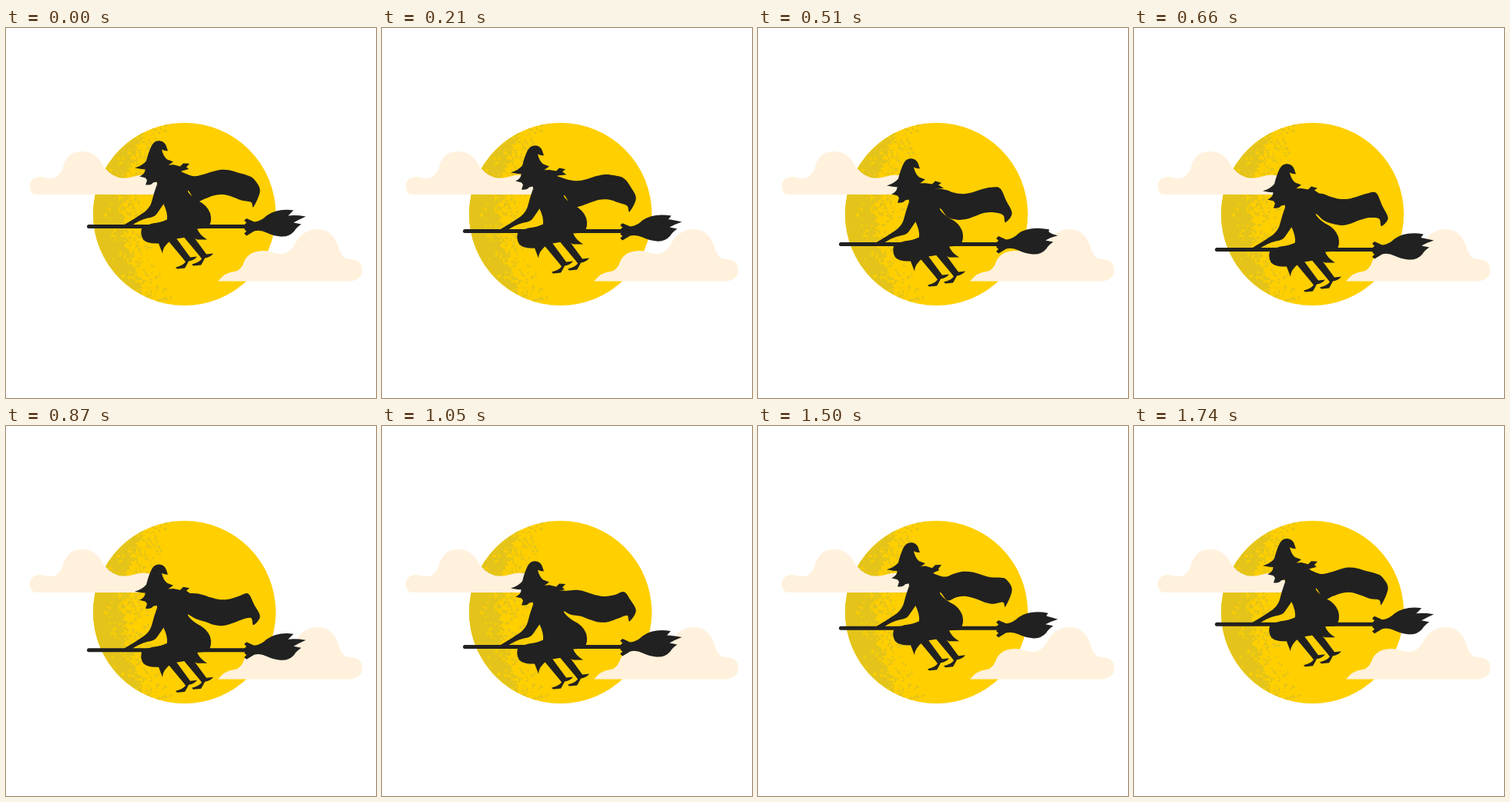
These frames come from a looping animation (480 by 480 pixels, 1.77 s). An HTML page with a canvas:

```html
<!DOCTYPE html>
<html lang="en">
<head>
<meta charset="utf-8">
<title>Witch over the moon</title>
<style>
html, body { margin: 0; width: 100%; height: 100%; overflow: hidden; background: #fff; }
canvas { display: block; width: 480px; height: 480px; }
</style>
</head>
<body>
<canvas id="stage" width="480" height="480"></canvas>
<script>
const ctx = document.getElementById('stage').getContext('2d');
const LOOP = 1770, STEP = 30, TAU = Math.PI * 2;
const INK = '#212121', GOLD = '#ffcf00', SHADE = '#e4c41a', CREAM = '#fff1dc';
const MOON = { x: 231.5, y: 241.5, r: 118.5 };

// Rigid silhouette parts; y = 0 is the broomstick
const HAT = new Path2D('M167 -76 Q177 -79 182 -85 Q185 -97 189 -105 Q193 -112 200 -111 Q206 -110 208 -104 L210 -98 Q205 -98 202 -100 Q204 -91 209 -87 L217 -84 Q211 -79 204 -76 L184 -74 Q176 -74 167 -76Z');
const FACE = new Path2D('M181 -76 L180 -71 Q178 -67 173 -65 L181 -63 L183 -60 L181 -54 Q188 -53 191 -57 L196 -58 L198 -48 L226 -48 L230 -70 L208 -80Z');
const TORSO = new Path2D('M195 -62 Q197 -52 197 -44 L204 -30 Q210 -18 209 -9 Q201 -5 190 -4 L177 0 Q173 9 178 17 Q184 23 198 22 L203 35 Q203 26 215 17 L239 13 L248 17 L261 17 Q251 11 248 3 L262 2 Q268 -6 265 -17 Q261 -28 248 -34 Q240 -39 236 -45 L234 -68 L222 -72 L200 -74Z');
const ARM = new Path2D('M196 -55 Q192 -44 189 -32 Q187 -25 180 -19 Q167 -10 153 -2 L161 0 Q172 -8 184 -11 Q193 -12 196 -17 L205 -30Z');
const LEG = new Path2D('M205 12 L230 42 L233 46 Q229 51 220 53 L222 55 L232 54 Q235 49 237 45 Q244 44 248 39 L239 40 L217 10Z');

// 1 at the peak time, -1 half a period away
const swing = (t, peak, period = LOOP) => Math.cos((t - peak) / period * TAU);

// Closed curve through all points
function smooth(g, pts) {
  const n = pts.length, at = i => pts[(i + n) % n];
  g.beginPath();
  g.moveTo(...pts[0]);
  for (let i = 0; i < n; i++) {
    const [a, b, c, d] = [at(i - 1), at(i), at(i + 1), at(i + 2)];
    g.bezierCurveTo(b[0] + (c[0] - a[0]) / 6, b[1] + (c[1] - a[1]) / 6,
      c[0] - (d[0] - b[0]) / 6, c[1] - (d[1] - b[1]) / 6, c[0], c[1]);
  }
  g.fill();
}

function makeRandom(seed) {
  return () => (seed = (seed * 16807) % 2147483647) / 2147483647;
}

function drawMoon(g) {
  const rnd = makeRandom(77);
  const clamp = v => Math.max(0, Math.min(1, v));
  const edge = y => 196 + 28 * ((y - MOON.y) / MOON.r) ** 2;
  g.save();
  g.beginPath();
  g.arc(MOON.x, MOON.y, MOON.r, 0, TAU);
  g.fillStyle = GOLD;
  g.fill();
  g.clip();
  // grainy shadow, dense at the left rim
  g.fillStyle = SHADE;
  g.beginPath();
  g.moveTo(100, 110);
  for (let y = 110; y <= 370; y += 3) g.lineTo(edge(y) - 46 + rnd() * 8, y);
  g.lineTo(100, 370);
  g.fill();
  for (let i = 0; i < 2800; i++) {
    const x = 112 + rnd() * 112, y = 122 + rnd() * 240;
    const depth = (edge(y) - x) / 50;
    const light = depth > 0.85;
    const chance = light ? 0.25 * clamp(1.6 - depth) : clamp(depth) ** 1.2 * 0.85;
    const w = 0.7 + rnd() * 1.8, h = 0.6 + rnd() * 1.3, turn = rnd() * 3;
    if (rnd() > chance) continue;
    g.fillStyle = light ? GOLD : SHADE;
    g.beginPath();
    g.ellipse(x, y, w, h, turn, 0, TAU);
    g.fill();
  }
  g.restore();
}

function drawClouds(g) {
  g.fillStyle = CREAM;
  g.fill(new Path2D('M41 216 Q31 216 31 206 Q31 194 43 193 Q49 193 54 195 Q67 197 73 184 Q78 160 98 160 Q115 160 123 174 Q132 190 146 194 Q155 196 165 193 Q179 188 190 193 Q197 197 198 216Z'));
  g.fill(new Path2D('M275 328.500 Q284 317 296 316 Q305 315 309 303 Q315 289 334 289 Q343 289 349 292 Q366 297 375 280 Q385 261 405 261 Q424 262 431 283 Q435 300 446 300 Q462 300 462 314 Q462 327 446 328.500Z'));
}

function drawBroom(t) {
  ctx.lineWidth = 5;
  ctx.lineCap = 'round';
  ctx.beginPath();
  ctx.moveTo(107.5, 0);
  ctx.lineTo(318, 0);
  ctx.stroke();

  // bristles: the top notch opens and closes
  const k = 0.5 - 0.5 * swing(t, 0, LOOP / 2);
  ctx.beginPath();
  ctx.moveTo(322, -6);
  ctx.quadraticCurveTo(331, -7, 338, -14);
  ctx.quadraticCurveTo(352, -24, 373 + 5 * k, -21 + 2 * k);
  ctx.lineTo(366 + 12 * k, -14 - 3 * k);
  ctx.quadraticCurveTo(376, -15, 389, -13 + 2 * k);
  ctx.quadraticCurveTo(380, -9, 373, -5);
  ctx.lineTo(383, -3);
  ctx.quadraticCurveTo(376, 2, 374, 6);
  ctx.quadraticCurveTo(367, 14, 356, 13);
  ctx.quadraticCurveTo(346, 12, 338, 8);
  ctx.quadraticCurveTo(330, 4, 322, 6);
  // ragged binding
  for (let i = 0; i <= 8; i++) ctx.lineTo(i % 2 ? 309 : 312, 12 - i * 2.8);
  ctx.fill();
}

// A wave runs along the cape from the shoulder to the hem
function drawCape(t) {
  const wave = (x, crest) => Math.cos(((x - crest) / 78 - t / LOOP) * TAU);
  const top = [], bottom = [];
  for (let x = 242; x < 316; x += 12) {
    top.push([x, -69.5 - 4.2 * wave(x, 282)]);
    bottom.unshift([x + 4, -36.5 - 5 * wave(x + 4, 279)]);
  }
  const flap = 5 * swing(t, 1400);
  smooth(ctx, [[222, -71], ...top, [322, -60 - flap * 0.7], [329.5, -45 - flap],
    [321, -29 - 4 * swing(t, 1000)], ...bottom, [237, -46], [224, -54]]);
}

function drawHair(t) {
  const k = 1.5 * swing(t, 525);
  ctx.beginPath();
  ctx.moveTo(205, -79);
  ctx.lineTo(217, -80 + k / 2);
  ctx.lineTo(226, -78);
  ctx.lineTo(230, -82);
  ctx.lineTo(238, -81 + k);
  ctx.lineTo(234, -77);
  ctx.lineTo(238 + 2 * k, -74 + k);
  ctx.lineTo(228, -72);
  ctx.lineTo(218, -62);
  ctx.fill();
}

function drawWitch(t) {
  ctx.save();
  ctx.translate(0, 274 + 16.8 * swing(t, 841));
  ctx.fillStyle = ctx.strokeStyle = INK;
  drawBroom(t);
  drawCape(t);
  drawHair(t);
  for (const part of [HAT, FACE, TORSO, ARM, LEG]) ctx.fill(part);
  ctx.translate(21, -4);
  ctx.fill(LEG);
  ctx.restore();
}

const scene = document.createElement('canvas');
scene.width = scene.height = 480;
const back = scene.getContext('2d');
back.fillStyle = '#fff';
back.fillRect(0, 0, 480, 480);
drawMoon(back);
drawClouds(back);

const start = performance.now();

function frame() {
  const now = performance.now() - start;
  const t = Math.floor((now % LOOP) / STEP) * STEP;
  ctx.drawImage(scene, 0, 0);
  drawWitch(t);
  requestAnimationFrame(frame);
}

frame();
</script>
</body>
</html>
```
